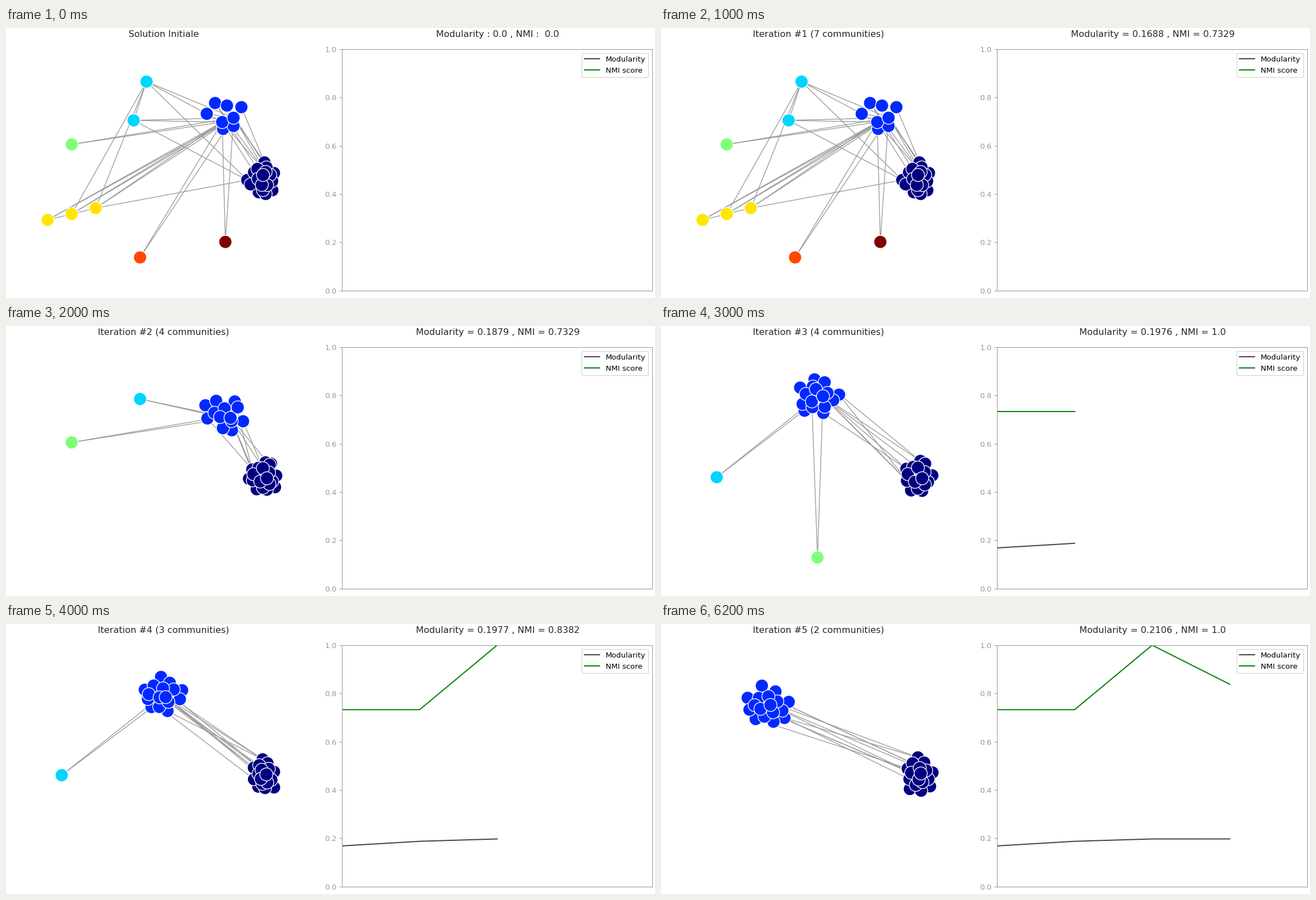
These frames come from a looping animation (1159x483 px, 7000 ms). A matplotlib script:

```python
import numpy as np
import matplotlib.pyplot as plt
from matplotlib.animation import FuncAnimation
from matplotlib.collections import LineCollection

W, H, DPI = 1159, 483, 100
K = 0.966  # scale of all point sizes
GRAY, DARK = "#999999", "#262626"
GROUP_COLORS = plt.cm.jet(np.arange(7) / 6)

CENTER, RADII = np.array([279.5, 270.5]), np.array([180, 143.5])
SPREADS = [(26, 32), (42, 31)]  # half extents of the two large communities
TILTS = {2: 1.83, 3: -0.3}      # direction of communities laid out in a row
GOLDEN = np.pi * (3 - 5**0.5)
CROSS_LINKS = 10

# Slots on the layout circle and community sizes for each iteration
LAYOUTS = [
    (7, [18, 8, 2, 1, 3, 1, 1]),
    (7, [19, 13, 1, 1]),
    (4, [16, 16, 1, 1]),
    (4, [17, 16, 1]),
    (3, [17, 17]),
]
MODULARITY = [0.1688, 0.1879, 0.1976, 0.1977, 0.2106]
NMI = [0.7329, 0.7329, 1.0, 0.8382, 1.0]

plt.rcParams.update({
    "font.family": "DejaVu Sans",
    "font.size": 10 * K,
    "axes.linewidth": 0.8 * K,
    "ytick.major.size": 3.5 * K,
    "ytick.major.pad": 3.5 * K,
    "ytick.major.width": 0.8 * K,
    "lines.linewidth": 1.5 * K,
    "patch.linewidth": 1.0 * K,
})


def cloud(n, spread, rng):
    """Loose sunflower spiral, hubs first."""
    k = np.arange(n)
    r = np.sqrt((k + 0.5) / n)
    spiral = np.column_stack([r * np.cos(k * GOLDEN), r * np.sin(k * GOLDEN)])
    return spiral * spread + rng.normal(0, 2.5, (n, 2))


def row(n):
    """Evenly spaced points on a tilted line around the middle."""
    t = (2 * np.arange(n) - n + 1) / max(n - 1, 1)
    tilt = TILTS.get(n, 0)
    return np.outer(t, [np.cos(tilt), np.sin(tilt)]) * RADII / 4


def place(slots, sizes, rng):
    groups = []
    for i, n in enumerate(sizes):
        angle = 2 * np.pi * i / slots
        middle = CENTER + RADII * [np.cos(angle), -np.sin(angle)]
        offsets = cloud(n, SPREADS[i], rng) if i < 2 else row(n)
        groups.append(middle + offsets)
    return groups


def connect(groups, rng):
    core, second, *small = groups
    edges = [(g[0], p) for g in (core, second) for p in g[1:]]

    # Random links reach the side of the core that faces the second group
    distance = np.hypot(*(core - second.mean(axis=0)).T)
    facing = core[distance.argsort()[:6]]
    for _ in range(CROSS_LINKS):
        source = second[int(len(second) * rng.random() ** 2)]
        edges.append((source, rng.choice(facing)))

    # Small communities hang on the two hubs of the second group
    for group in small:
        edges += [(p, hub) for p in group for hub in second[:2]]
        edges += zip(group, group[1:])

    # Those with several members also reach each other and the core
    several = [g for g in small if len(g) > 1]
    edge_of_core = core[core[:, 0].argmin()]
    edges += [(g[-1], edge_of_core) for g in several]
    for a, b in zip(several, several[1:]):
        edges += [(a[0], p) for p in (*b[1:], edge_of_core)]
    return edges


def network(slots, sizes):
    rng = np.random.default_rng(sum(sizes[:2]))
    groups = place(slots, sizes, rng)
    points = np.concatenate([g[::-1] for g in groups])  # hubs on top
    colors = np.repeat(GROUP_COLORS[:len(sizes)], sizes, axis=0)
    return points, colors, connect(groups, rng)


networks = [network(*layout) for layout in LAYOUTS]

fig = plt.figure(figsize=(W / DPI, H / DPI), dpi=DPI, facecolor="white")

# Network layer in stage pixels, y pointing down
graph = fig.add_axes([0, 0, 1, 1])
graph.set(xlim=(0, W), ylim=(H, 0))
graph.axis("off")
edge_lines = LineCollection([], colors=GRAY, linewidths=1.0 * K, zorder=1)
graph.add_collection(edge_lines)
nodes = graph.scatter([], [], s=300 * K**2, edgecolors="white",
                      linewidths=1.0 * K, zorder=2)
left_title, right_title = (
    graph.text(x, 16, "", ha="center", va="baseline", size=12 * K, color=DARK)
    for x in (281.5, 878)
)

left, right, top, bottom = 600.1, 1154.1, 37.9, 469.9
chart = fig.add_axes([left / W, 1 - bottom / H,
                      (right - left) / W, (bottom - top) / H])
chart.set(xlim=(0, 4), ylim=(0, 1), xticks=[])
chart.tick_params(colors=GRAY)
chart.spines[:].set_color(GRAY)
mod_line, = chart.plot([], [], color="#444444", label="Modularity")
nmi_line, = chart.plot([], [], color="green", label="NMI score")
chart.legend(loc="upper right")


def update(frame):
    step = min(frame, len(networks))
    i = max(step - 1, 0)
    points, colors, edges = networks[i]
    nodes.set_offsets(points)
    nodes.set_facecolor(colors)
    edge_lines.set_segments(edges)

    if step == 0:
        left_title.set_text("Solution Initiale")
        right_title.set_text("Modularity : 0.0 , NMI :  0.0")
    else:
        count = len(LAYOUTS[i][1])
        left_title.set_text(f"Iteration #{step} ({count} communities)")
        right_title.set_text(f"Modularity = {MODULARITY[i]} , NMI = {NMI[i]}")

    # The curves lag one iteration behind the titles
    mod_line.set_data(range(i), MODULARITY[:i])
    nmi_line.set_data(range(i), NMI[:i])
    return nodes, edge_lines, left_title, right_title, mod_line, nmi_line


anim = FuncAnimation(fig, update, frames=7, interval=1000, repeat=True,
                     repeat_delay=0, blit=False)
plt.show()
```
